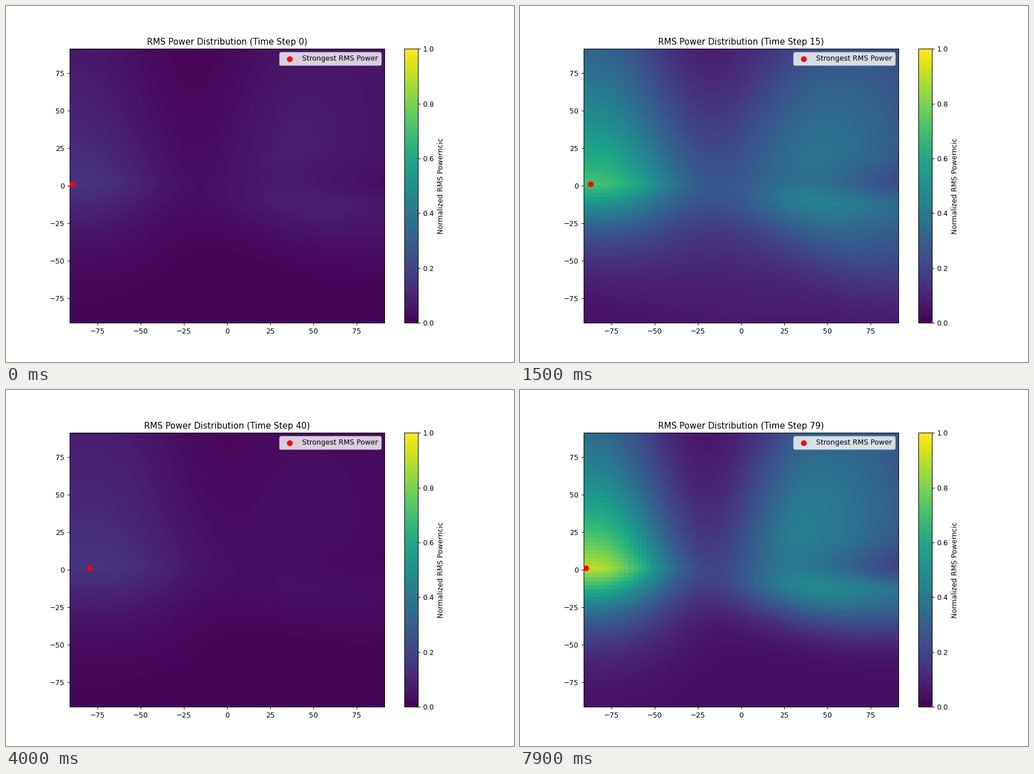
A matplotlib script for the animation above (8 s loop, 894 by 626 pixels).

```python
import matplotlib.pyplot as plt
import numpy as np
from matplotlib.animation import FuncAnimation

WIDTH, HEIGHT, DPI = 894, 626, 90
STEPS = 80
INTERVAL = 100
CELLS = 70

angles = np.linspace(-90, 90, CELLS)
half_cell = (angles[1] - angles[0]) / 2
edge = 90 + half_cell
X, Y = np.meshgrid(angles, angles)


def falloff(values, centre, below, above, power=2.0):
    """Peak of one with its own width on either side."""
    offset = values - centre
    width = np.where(offset < 0, below, above)
    return np.exp(-(np.abs(offset) / width) ** power)


def bell(values, centre, below, above):
    return falloff(values, centre, below * 2 ** .5, above * 2 ** .5)


def left_source(burst, wander):
    """Main source near the left edge, fading slowly upward."""
    centre = -90 + 10.5 * wander
    width = 50 + 5 * burst + 8 * wander - 8 * np.maximum(Y, 0) / 90
    rise = 88 + 25 * burst + 45 * wander
    vertical = np.where(Y > 0, falloff(Y, half_cell, rise, rise, 1),
                        falloff(Y, half_cell, 31, 31, 1.3))
    return falloff(X, centre, width, width, 2.3) * vertical


def right_source(burst, wander):
    """Two tilted lobes on the right, parted by a notch near zero."""
    upper_x = 34 + 14 * burst + 0.2 * (Y - 22)
    upper = bell(X, upper_x, 28 + 9 * burst, 60) * bell(Y, 22, 26, 85)
    lower_x = 52 - 0.7 * (Y + 15)
    lower = bell(X, lower_x, 34, 90) * bell(Y, -15, 20 + 20 * burst, 11)
    notch = bell(X, 88, 25, 40) * bell(Y, 0, 7, 10)
    return (1 - 0.6 * wander) * (0.45 * upper + 0.34 * lower - 0.1 * notch)


def power_map(step):
    burst = bell(step, 11, 5.5, 7.4)
    wander = bell(step, 42, 7, 7)
    level = (0.045 + 0.68 * burst + 0.095 * bell(step, 38, 14, 9)
             + 0.35 * bell(step, 59, 2.5, 3) + 0.82 * bell(step, 79, 2.8, 1))
    haze = (0.09 * bell(step, 16, 4, 6)
            * bell(X, 0, 50, 80) * bell(Y, -15, 60, 60))
    field = (0.01 + 0.03 * level + haze
             + level * (left_source(burst, wander)
                        + right_source(burst, wander)))
    return np.clip(field, 0, 1)


# The tiny margin keeps the canvas from rounding down a pixel.
fig, ax = plt.subplots(figsize=((WIDTH + .01) / DPI, (HEIGHT + .01) / DPI),
                       dpi=DPI)
image = ax.imshow(power_map(0), cmap="viridis", vmin=0, vmax=1,
                  origin="lower", aspect="auto", interpolation="nearest",
                  extent=(-edge, edge, -edge, edge))
fig.colorbar(image, ax=ax, label="Normalized RMS Powerncic")
peak = ax.scatter([-90], [half_cell], color="red", s=50, zorder=3,
                  label="Strongest RMS Power")
ax.set_xlim(-edge, edge)
ax.set_ylim(-edge, edge)
ax.legend(loc="upper right")
title = ax.set_title("")


def update(step):
    field = power_map(step)
    row, column = np.unravel_index(np.argmax(field), field.shape)
    image.set_data(field)
    peak.set_offsets([(angles[column], angles[row])])
    title.set_text(f"RMS Power Distribution (Time Step {step})")
    return image, peak, title


animation = FuncAnimation(fig, update, frames=STEPS, interval=INTERVAL,
                          repeat=True, repeat_delay=0)
plt.show()
```
